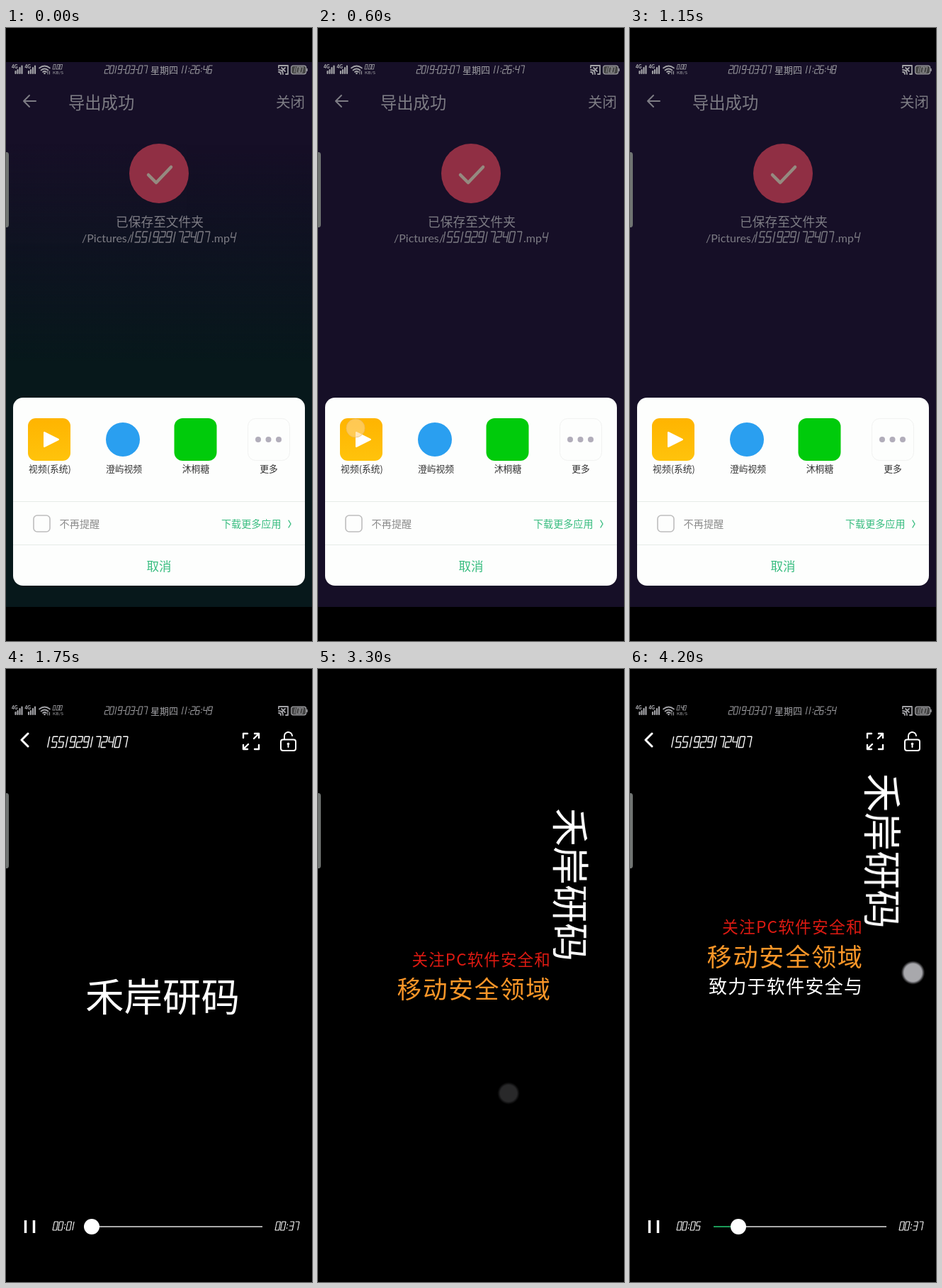
An HTML page that plays this animation: 432 px wide and 864 px high, repeating every 4250 ms.

```html
<!DOCTYPE html>
<html lang="zh-CN">
<head>
<meta charset="utf-8">
<title>Screen recording</title>
<style>
html, body { margin: 0; width: 100%; height: 100%; overflow: hidden; background: #000; }
svg { display: block; width: 432px; height: 864px; }
text { font-family: "Noto Sans CJK SC", "Noto Sans CJK JP", "Noto Sans CJK", sans-serif; font-weight: 350; fill: currentColor; }
.latin { font-family: Lato, sans-serif; font-weight: 400; }
.mid { text-anchor: middle; }
.end { text-anchor: end; }
.seg, .line { fill: none; stroke: currentColor; stroke-linecap: round; stroke-linejoin: round; }
.grey { color: #7d7c84; }
.green { color: #39bd80; }
.white { color: #fff; }

#dialog, #player, #controls, #status, #title, #cam, .row, .tap, #tint {
  animation: 4250ms linear infinite;
}
#dialog { animation-name: dialog; animation-timing-function: step-end; }
#player { animation-name: player; animation-timing-function: step-end; }
#controls { animation-name: controls; animation-timing-function: step-end; }
#status { animation-name: status; }
#tint { animation-name: tint; }
#title { animation-name: title; animation-timing-function: ease-in-out; }
#cam { animation-name: cam; animation-timing-function: ease-in-out; transform-origin: 327px 444px; }
.row { animation-timing-function: ease-out; }
.row text { font-weight: 300; letter-spacing: .05em; }
#row1 { animation-name: row1; }
#row2 { animation-name: row2; }
#row3 { animation-name: row3; }
#tap1 { animation-name: tap1; }
#tap2 { animation-name: tap2; }
#tap3 { animation-name: tap3; }

@keyframes dialog { 0% { opacity: 1 } 29.4%, 100% { opacity: 0 } }
@keyframes player { 0% { opacity: 0 } 29.4%, 100% { opacity: 1 } }
@keyframes controls { 0% { opacity: 1 } 60% { opacity: 0 } 80%, 100% { opacity: 1 } }
@keyframes status {
  0%, 63.5% { transform: none; opacity: 1 }
  66%, 80% { transform: translateY(-10px); opacity: 0 }
  82.3%, 100% { transform: none; opacity: 1 }
}
@keyframes tint { 0% { opacity: 1 } 13%, 100% { opacity: 0 } }
@keyframes title {
  0%, 32.9% { transform: translate(330px, 488px) scale(.2); opacity: 0 }
  37.6%, 48.2% { transform: translate(330px, 488px) rotate(0deg) scale(1); opacity: 1 }
  52.9%, 100% { transform: translate(330px, 446px) rotate(90deg) scale(1.1); opacity: 1 }
}
@keyframes cam {
  0%, 65.9% { transform: none }
  70.6%, 84.7% { transform: translateY(-34px) scale(.9) }
  90.6%, 100% { transform: translateY(-80px) scale(.912) }
}
@keyframes row1 {
  0%, 52.9% { transform: scale(.1); opacity: 0 }
  57.6%, 100% { transform: none; opacity: 1 }
}
@keyframes row2 {
  0%, 65.9% { transform: scale(.1); opacity: 0 }
  70.6%, 100% { transform: none; opacity: 1 }
}
@keyframes row3 {
  0%, 84.7% { transform: scale(.1); opacity: 0 }
  90.6%, 100% { transform: none; opacity: 1 }
}
@keyframes tap1 { 0%, 11.7% { opacity: 0 } 13%, 15.3% { opacity: 1 } 18.8%, 100% { opacity: 0 } }
@keyframes tap2 { 0%, 72.9% { opacity: 0 } 74%, 75.3% { opacity: .85 } 77.65% { opacity: .22 } 78.8%, 100% { opacity: 0 } }
@keyframes tap3 { 0%, 95.3% { opacity: 0 } 97.6%, 100% { opacity: .9 } }
</style>
</head>
<body>
<svg viewBox="0 0 432 864">
  <defs>
    <linearGradient id="gold" x2="0" y2="1">
      <stop stop-color="#ffb400"/><stop offset="1" stop-color="#ffc30c"/>
    </linearGradient>
    <linearGradient id="teal" x2="0" y2="1">
      <stop offset=".15" stop-color="#08191c" stop-opacity="0"/><stop offset=".55" stop-color="#08191c"/>
    </linearGradient>
    <radialGradient id="touch">
      <stop offset=".72" stop-color="#bcbcc0"/><stop offset=".8" stop-color="#8a8a90"/>
      <stop offset="1" stop-color="#555" stop-opacity="0"/>
    </radialGradient>
    <g id="signal">
      <text class="latin" y="57" font-size="6.500" style="font-weight:900">4G</text>
      <path class="line" stroke-width="2.200" stroke-linecap="butt" d="M5.500 64v-3M8.500 64v-5M11.500 64v-8M14.500 64v-10.500"/>
    </g>
  </defs>
  <rect width="432" height="864"/>

  <g id="dialog">
    <rect y="48" width="432" height="768" fill="#160f27"/>
    <rect id="tint" y="48" width="432" height="768" fill="url(#teal)"/>
    <g class="grey">
      <path class="line" stroke-width="2" d="M42 103H25M33 95l-8 8 8 8"/>
      <text x="88" y="113.500" font-size="23.300">导出成功</text>
      <text x="381" y="111.500" font-size="20.500">关闭</text>
      <text class="mid" x="217" y="279.500" font-size="17.700">已保存至文件夹</text>
      <text class="latin" x="107" y="301.500" font-size="16">/Pictures/</text>
      <path class="seg" data-text="1551929172407" data-h="15" transform="translate(175 302)"/>
      <text class="latin" x="290" y="301.500" font-size="16">.mp</text>
      <path class="seg" data-text="4" data-h="14" transform="translate(316 302)"/>
    </g>
    <circle cx="216" cy="205" r="42" fill="#902f44"/>
    <path class="line" stroke-width="4.500" style="color:#958a80" d="M201 207l11 11 21-22"/>

    <rect x="10" y="521" width="412" height="265" rx="14" fill="#fdfefd"/>
    <path d="M10 667.500H422M10 728.500H422" stroke="#e6ebe8"/>
    <rect x="31" y="550" width="60" height="60" rx="11" fill="url(#gold)"/>
    <path d="M54 570v20l20-10z" fill="#fff" stroke="#fff" stroke-width="2" stroke-linejoin="round"/>
    <circle cx="165" cy="580" r="24" fill="#2a9ff0"/>
    <rect x="237.500" y="550" width="60" height="60" rx="12" fill="#00cb0b"/>
    <rect x="341.500" y="550.500" width="59" height="59" rx="11" fill="none" stroke="#f1f2f1"/>
    <g fill="#b1adba"><circle cx="356" cy="580" r="4"/><circle cx="370.500" cy="580" r="4"/><circle cx="385" cy="580" r="4"/></g>
    <g class="mid" font-size="12.800" style="color:#333">
      <text x="62" y="626">视频(系统)</text>
      <text x="166.500" y="626">澄屿视频</text>
      <text x="268" y="626">沐桐糖</text>
      <text x="371" y="626">更多</text>
    </g>
    <rect x="39" y="687" width="23" height="23" rx="5" fill="none" stroke="#bdbdbd" stroke-width="1.600"/>
    <text x="75.500" y="704" font-size="14.200" style="color:#8b8b8b">不再提醒</text>
    <g class="green">
      <text x="304" y="704" font-size="14.100">下载更多应用</text>
      <path class="line" stroke-width="1.400" d="M399 694q3 5 3 5t-3 5"/>
      <text class="mid" x="216" y="764.500" font-size="17.500">取消</text>
    </g>
    <circle id="tap1" class="tap" cx="53" cy="564" r="13" fill="#ffd58a" fill-opacity=".6" stroke="#e8b868" stroke-opacity=".7"/>
  </g>

  <g id="player" class="white">
    <rect width="432" height="864" fill="#000"/>
    <g id="cam">
      <g id="title"><text class="end" y="-6.500" font-size="54.500">禾岸研码</text></g>
      <g transform="translate(328 444)"><g id="row1" class="row"><text class="end" x="1" y="9.300" font-size="25">关注PC软件安全和</text></g></g>
      <g transform="translate(328 490)"><g id="row2" class="row"><text class="end" x="2" y="14.500" font-size="38.500" style="color:#fa9628">移动安全领域</text></g></g>
      <g transform="translate(328 535)"><g id="row3" class="row"><text class="end" x="1.500" y="10.800" font-size="28.500">致力于软件安全与</text></g></g>
    </g>
    <g id="controls">
      <path class="line" stroke-width="3" d="M31 91l-9 9 9 9"/>
      <path class="seg" data-text="1551929172407" data-h="15.300" transform="translate(57 110.500)"/>
      <path class="line" stroke-width="2.400" d="M335 97v-6h6M351 91h6v6M357 107v6h-6M341 113h-6v-6M356 92l-6 6M336 112l6-6"/>
      <path class="line" stroke-width="2" d="M391 99.500h15q3 0 3 3v9.500q0 3-3 3h-15q-3 0-3-3v-9.500q0-3 3-3zM393 99v-4a5.500 5.500 0 0 1 11-1M398.500 106v4"/>
      <circle cx="398.500" cy="105.500" r="1.800" fill="#fff"/>
      <path d="M27.500 777v18M39.500 777v18" stroke="#fff" stroke-width="3.500"/>
      <path id="elapsed" class="seg" data-text="00:00" data-h="12" transform="translate(66 791)"/>
      <path d="M118 786H362" stroke="#a9a9a9" stroke-width="2"/>
      <line id="played" x1="118" y1="786" x2="118" y2="786" stroke="#1c9a58" stroke-width="2"/>
      <circle id="knob" cx="118" cy="786" r="11" fill="#fff"/>
      <path class="seg" data-text="00:37" data-h="12" transform="translate(380 791)"/>
    </g>
    <circle id="tap2" class="tap" cx="269" cy="598" r="16" fill="url(#touch)"/>
    <circle id="tap3" class="tap" cx="399.500" cy="428" r="17" fill="url(#touch)"/>
  </g>

  <g id="status" style="color:#a2a2a6">
    <use href="#signal" x="8"/>
    <use href="#signal" x="26.500"/>
    <path class="line" stroke-width="1.700" d="M47 56.500q7.500-6 15 0M49.500 59.500q5-4 10 0M52 62q2.500-2 5 0"/>
    <circle cx="54.500" cy="64" r="1.300" fill="currentColor"/>
    <path class="line" stroke-width="1" d="M59 61v4M61.500 65v-4"/>
    <path id="rate" class="seg" data-text="0.00" data-h="6.500" transform="translate(66 58)"/>
    <text class="latin" x="66" y="65" font-size="6.500">KB/S</text>
    <path class="seg" data-text="2019-03-07" data-h="11" transform="translate(139 64)"/>
    <text x="204" y="64" font-size="13">星期四</text>
    <path id="clock" class="seg" data-text="11:26:46" data-h="11" transform="translate(247 64)"/>
    <path class="line" stroke-width="1.800" d="M385 56v-3h13v12h-3M385 59q6 0 6 6M385 62q3 0 3 3M389 56l5 5M394 56l-4 4"/>
    <rect x="402.700" y="53.200" width="21" height="11.600" rx="3" fill="#444" stroke="currentColor" stroke-width="1.200"/>
    <path d="M425 57v4" stroke="currentColor" stroke-width="1.500"/>
    <path class="seg" data-text="100" data-h="8" transform="translate(406 63)"/>
  </g>
  <path d="M0 175h1q3 0 3 4v98q0 4-3 4h-1z" fill="#707472"/>
</svg>
<script>
const LOOP = 4250, SECOND = 520;
const $ = id => document.getElementById(id);

// Seven-segment digits: bit n of a mask lights BARS[n].
const MASKS = [63, 6, 91, 79, 102, 109, 125, 7, 127, 111];
const BARS = ['0212', '1211', '1110', '0010', '0100', '0201', '0111'];
const ADVANCE = { 1: .7, ':': .55, '-': .6, '.': .35 };

function segPath(text, h) {
  const w = h * .44, half = h / 2, slant = .2;
  let x = 0, d = '';
  const at = (px, py) => (x + px * w + py * half * slant).toFixed(2) + ' ' + (-py * half).toFixed(2);
  const bar = (x1, y1, x2, y2) => {
    const gx = (x2 - x1) * .06, gy = (y2 - y1) * .06;
    d += `M${at(x1 + gx, y1 + gy)}L${at(x2 - gx, y2 - gy)}`;
  };
  for (const c of text) {
    if (c === ':') { bar(.2, .4, .2, .6); bar(.2, 1.2, .2, 1.4); }
    else if (c === '-') bar(0, 1, .7, 1);
    else if (c === '.') bar(.1, 0, .1, .05);
    else {
      const left = c === '1' ? .75 : 0;
      BARS.forEach((b, i) => {
        if (MASKS[c] >> i & 1) bar(b[0] - left, +b[1], b[2] - left, +b[3]);
      });
    }
    x += h * .62 * (ADVANCE[c] || 1);
  }
  return d;
}

function setSeg(el, text) {
  if (el.shown === text) return;
  el.shown = text;
  const h = +el.dataset.h;
  el.setAttribute('d', segPath(text, h));
  el.setAttribute('stroke-width', Math.max(.8, h * .09));
  el.setAttribute('aria-label', text);
}

document.querySelectorAll('.seg').forEach(el => setSeg(el, el.dataset.text));
$('row1').style.color = '#dc1a12';

let start;
function draw(now) {
  start ??= now;
  const t = (now - start) % LOOP;
  setSeg($('clock'), '11:26:' + (46 + Math.floor((t + 220) / SECOND)));
  setSeg($('elapsed'), '00:0' + Math.max(0, Math.floor((t - 1230) / SECOND)));
  setSeg($('rate'), t < 2300 ? '0.00' : t < 3400 ? '823' : '0.40');
  const x = Math.max(118, 121 + (t - 1750) * .01306);
  $('knob').setAttribute('cx', x);
  $('played').setAttribute('x2', x);
  requestAnimationFrame(draw);
}
requestAnimationFrame(draw);
</script>
</body>
</html>
```
